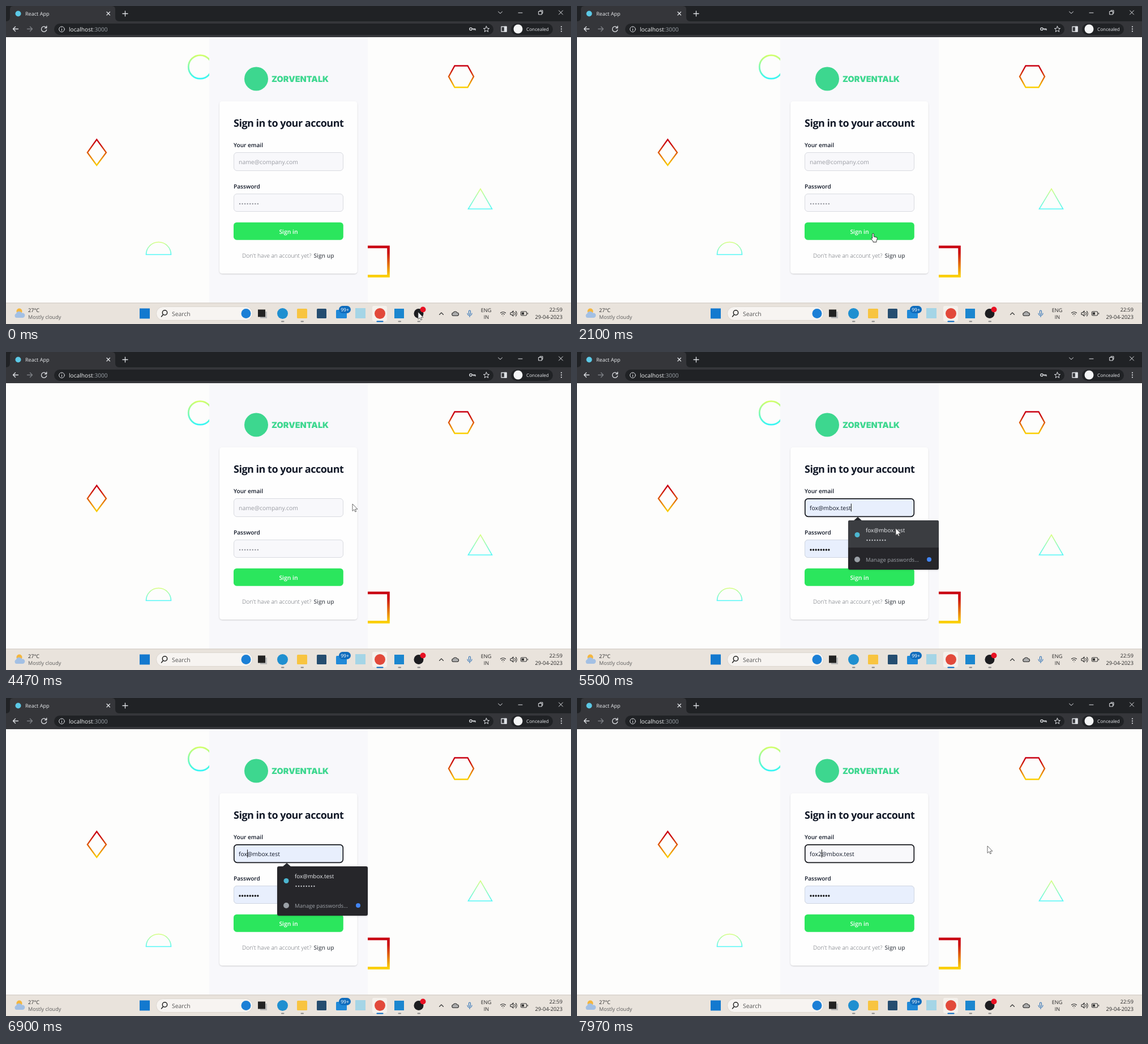
Write an HTML page that moves like this. It is 998x561 px and loops after 8000 ms.

```html
<!DOCTYPE html>
<html lang="en">
<head>
<meta charset="utf-8">
<title>Sign in</title>
<style>
html, body { margin: 0; width: 100%; height: 100%; overflow: hidden; background: #fdfdfc; }
svg { display: block; width: 100%; height: 100%; }
text { font-family: "Open Sans", "Noto Sans", sans-serif; font-size: 10.4px; fill: #111827; text-rendering: geometricPrecision; }
.small { font-size: 9.1px; fill: #262626; }
.label { font-size: 10.1px; font-weight: 600; }
.mid { text-anchor: middle; }
.end { text-anchor: end; }
.line { fill: none; stroke-linecap: round; stroke-linejoin: round; }
.chrome { stroke: #dfe1e5; stroke-width: 1.3; }
.tray { stroke: #303030; stroke-width: 1.1; }
.dots { stroke-dasharray: 0 4.55; }
.warm { stroke: url(#warm); fill: none; }
.cool { stroke: url(#cool); fill: none; }
.cue { opacity: 0; }
#bar { transform-box: fill-box; transform-origin: left; }
</style>
</head>
<body>
<svg viewBox="0 0 998 561" preserveAspectRatio="none">
  <defs>
    <linearGradient id="warm" x2="0" y2="1"><stop stop-color="#c90012"/><stop offset=".2" stop-color="#cc1010"/><stop offset="1" stop-color="#fbd000"/></linearGradient>
    <linearGradient id="cool" x2="0" y2="1"><stop stop-color="#d2ff6a"/><stop offset="1" stop-color="#35f6f6"/></linearGradient>
    <filter id="soft" x="-10%" y="-20%" width="120%" height="150%"><feDropShadow dx="0" dy="1" stdDeviation="1.2" flood-opacity=".18"/></filter>
    <filter id="lift" x="-10%" y="-20%" width="120%" height="160%"><feDropShadow dx="0" dy="1" stdDeviation="4" flood-opacity=".16"/></filter>
  </defs>

  <!-- page -->
  <rect width="998" height="561" fill="#fdfdfc"/>
  <circle class="cool" cx="343" cy="107.5" r="20.7" stroke-width="2.8"/>
  <path class="warm" stroke-width="2.4" d="M782 124.5 792.5 105.500H815.500L826 124.500 815.500 143.500H792.500Z"/>
  <path class="warm" stroke-width="2.3" d="M160.200 235.500 177 258.500 160.200 281 143.800 258.500Z"/>
  <path class="cool" stroke-width="1.6" opacity=".85" d="M838 322.500 858.500 358H816.500Z"/>
  <path class="cool" stroke-width="1.6" opacity=".85" d="M247.500 438.500A22 22 0 0 1 291.500 438.500Z"/>
  <rect class="warm" x="622" y="425" width="53.500" height="51.500" stroke-width="4.600"/>
  <rect x="359" y="55" width="280" height="469" fill="#f8f8fb"/>

  <circle cx="442" cy="128.500" r="21" fill="#3dd78f"/>
  <text x="469" y="133.500" style="font:900 14.500px Inter,sans-serif;fill:#3dd78f">ZORVENTALK</text>

  <rect x="377" y="168" width="243.500" height="304" rx="5" fill="#fefefe" filter="url(#soft)"/>
  <text x="402" y="213" style="font-size:18px;font-weight:700;letter-spacing:-.5px">Sign in to your account</text>
  <text class="label" x="402" y="248.500">Your email</text>
  <text class="label" x="402" y="321.500">Password</text>
  <g stroke="#d9dbe1" fill="#f8f8fb">
    <rect x="402.500" y="258.500" width="193" height="32" rx="5.500"/>
    <rect x="402.500" y="331.500" width="193" height="31" rx="5.500"/>
  </g>
  <g id="placeholder" class="cue">
    <text x="411" y="279" style="fill:#9a9ca3">name@company.com</text>
    <path class="line dots" stroke="#96989f" stroke-width="2.500" d="M413 349H446"/>
  </g>
  <rect id="mailTint" class="cue" x="402.500" y="258.500" width="193" height="32" rx="5.500" fill="#e8effd"/>
  <g id="secret" class="cue">
    <rect x="402.500" y="331.500" width="193" height="31" rx="5.500" fill="#e8effd" stroke="#d0d6e2"/>
    <path class="line dots" stroke="#111" stroke-width="3.400" d="M413 349H446"/>
  </g>
  <rect id="focus" class="cue" x="402.800" y="258.800" width="192.500" height="31.500" rx="5.500" fill="none" stroke="#16181d" stroke-width="1.700"/>
  <text id="mail" class="cue" x="411" y="279">fox@mbox.test</text>
  <text id="mailEdited" class="cue" x="411" y="279">fox2@mbox.test</text>
  <g id="caret"><rect id="blink" class="cue" x="411" y="267.500" width="1" height="14" fill="#111"/></g>

  <rect id="ring" class="cue" x="399.500" y="379.500" width="198.500" height="36" rx="8" fill="#9dbdf0"/>
  <rect x="402" y="381.700" width="193.800" height="31" rx="5.500" fill="#2be65d"/>
  <text class="mid" x="499" y="402" style="font-weight:600;fill:#fff">Sign in</text>
  <text x="417" y="444" style="font-size:10.2px;font-weight:300;fill:#62666d">Don't have an account yet?</text>
  <text x="543.500" y="444" style="font-size:10.2px;font-weight:600;fill:#555960">Sign up</text>

  <!-- saved password list -->
  <g id="list" class="cue">
    <path d="M488 298 496 291 504 298Z" fill="#25272b"/>
    <rect x="479" y="297" width="160" height="87" rx="3" fill="#25272b" filter="url(#soft)"/>
    <path id="hover" class="cue" d="M479 345V300Q479 297 482 297H636Q639 297 639 300V345Z" fill="#3b3d41"/>
    <circle cx="495" cy="322.500" r="4.500" fill="#4cb6d0"/>
    <text x="510" y="318" style="font-size:9.900px;fill:#eceef1">fox@mbox.test</text>
    <path class="line dots" stroke="#c3c5c9" stroke-width="2.400" d="M512.500 332H545"/>
    <circle cx="495" cy="366" r="5" fill="#9aa0a6"/>
    <text x="510" y="370" style="font-size:9.600px;fill:#9da1a7">Manage passwords...</text>
    <circle cx="622" cy="366" r="4" fill="#4285f4"/>
  </g>

  <!-- toast -->
  <g id="toast" class="cue">
    <rect x="738.500" y="71" width="244.500" height="50" rx="2" fill="#fff" filter="url(#lift)"/>
    <path class="line" d="M758 90 764.500 102H751.500Z" stroke="#e9c515" stroke-width="2.500" style="fill:#e9c515"/>
    <path class="line" d="M758 93V97.500M758 100.500V100.600" stroke="#fff" stroke-width="1.700"/>
    <text class="mid" x="867" y="100.500" style="font:12.600px 'Liberation Sans',Arial,sans-serif;fill:#757575">Please fill all feilds !</text>
    <path class="line" d="M967 81 973 87M973 81 967 87" stroke="#777" stroke-width="1.500"/>
    <rect id="bar" x="738.500" y="118" width="244.500" height="3" fill="#e6c41c"/>
  </g>

  <!-- browser frame -->
  <rect width="998" height="27" fill="#202225"/>
  <path d="M0 27Q7 27 7 20V6Q7 0 13 0H187Q193 0 193 6V20Q193 27 200 27H998V55H0Z" fill="#35363a"/>
  <rect x="85" y="31" width="776" height="20" rx="10" fill="#202225"/>
  <rect x="892" y="31" width="74" height="20" rx="10" fill="#202225"/>
  <circle cx="21.500" cy="13.500" r="5" fill="#5cc9e6"/>
  <text class="small" x="34" y="17" style="fill:#e8eaed">React App</text>
  <text x="111" y="44.700" style="font-size:10.200px;fill:#f1f3f4">localhost<tspan fill="#9aa0a6">:3000</tspan></text>
  <circle cx="904.500" cy="40.500" r="8" fill="#f4f5f6"/>
  <text class="small" x="919" y="44" style="font-size:8.200px;fill:#e8eaed">Concealed</text>
  <g class="line chrome">
    <path d="M178 10.500 183.500 16M183.500 10.500 178 16M206 13.500H215M210.500 9V18"/>
    <path d="M21.500 40.500H12.500M16.500 36.500 12.500 40.500 16.500 44.500"/>
    <path d="M37.500 40.500H46.500M42.500 36.500 46.500 40.500 42.500 44.500" stroke="#7c7f84"/>
    <path d="M71 38A4.700 4.700 0 1 0 71.700 42M71.800 35.500V38.800H68.500"/>
    <path d="M98.500 40.500V43.500M98.500 38V38.100" stroke-width="1"/><circle cx="98.500" cy="41" r="4.800" stroke-width="1"/>
    <circle cx="821" cy="40.500" r="2.200"/><path d="M823.500 40.500H829V42.500M826.500 40.500V42"/>
    <path d="M848.500 35.500 850 39.300 853.500 39.600 850.800 42 851.700 45.500 848.500 43.500 845.300 45.500 846.200 42 843.500 39.600 847 39.300Z" stroke-width="1"/>
    <path d="M875 36.500H884V45H875Z"/><path d="M880.500 36.500H884V45H880.500Z" fill="#dfe1e5"/>
    <path d="M981 36.500V36.600M981 40.500V40.600M981 44.500V44.600" stroke-width="2.200"/>
    <path d="M869.500 10 873 13.200 876.500 10M905 12H912M941 9.500H946.500V15H941ZM943 9.500V7.800H948V13H946.500M976.500 8 983.500 15M983.500 8 976.500 15" stroke-width="1"/>
  </g>

  <!-- taskbar -->
  <rect y="523.500" width="998" height="37.500" fill="#e9e3dc"/>
  <path d="M0 524H998" stroke="#cfcac4"/>
  <circle cx="23.500" cy="538.500" r="5" fill="#f4b63d"/>
  <path d="M18 550A4 4 0 0 1 18 542.500 5.500 5.500 0 0 1 28 541.500 4.300 4.300 0 0 1 30 550Z" fill="#a3c0e4"/>
  <text class="small" x="39" y="539.500">27°C</text>
  <text class="small" x="39" y="552" style="fill:#5b5b5b">Mostly cloudy</text>
  <rect x="236" y="533.500" width="18" height="18" fill="#1379cf"/>
  <rect x="265.500" y="530.500" width="170" height="24" rx="12" fill="#f7f4f1" stroke="#ddd7d0"/>
  <g class="line" stroke="#222" stroke-width="1.500"><circle cx="280.500" cy="541" r="4.200"/><path d="M277.500 544.500 274.500 548"/></g>
  <text x="293" y="546.500" style="fill:#555">Search</text>
  <circle cx="424" cy="542.500" r="8.500" fill="#1b7fd6"/>
  <rect x="449" y="539" width="12" height="12" fill="#bcbcbc"/><rect x="445" y="535.500" width="13" height="13" fill="#222"/>
  <circle cx="488.500" cy="542.500" r="9.500" fill="#1f8fd0"/>
  <rect x="514" y="534" width="18" height="17" rx="1.500" fill="#f8c440"/>
  <rect x="549" y="534" width="17" height="17" rx="1.500" fill="#254d70"/>
  <rect x="583" y="536" width="19" height="15" rx="1.500" fill="#2089d8"/>
  <rect x="588" y="529" width="21" height="13" rx="6.500" fill="#0f6cbd"/>
  <text class="mid" x="598.500" y="538.800" style="font-size:8.600px;fill:#fff">99+</text>
  <rect x="617" y="533" width="18" height="18" fill="#a5d5e6"/>
  <rect x="647" y="529" width="26" height="27" rx="3" fill="#f5f1ec"/>
  <circle cx="660.500" cy="542.500" r="9.500" fill="#e2493a"/>
  <rect x="686" y="534" width="17" height="17" fill="#1b86cf"/>
  <circle cx="729" cy="542.500" r="8.500" fill="#1d1d20"/><circle cx="736.500" cy="535.500" r="5" fill="#e81123"/>
  <path class="line" stroke="#888" stroke-width="2" d="M487 556.500H490.500M521.500 556.500H525M693.500 556.500H697M727.500 556.500H731"/>
  <path class="line" stroke="#0067c0" stroke-width="2.200" d="M655.500 556.500H665.500"/>
  <g class="line tray">
    <path d="M765.500 544.500 769 541 772.500 544.500"/>
    <path d="M790 546.500A2.800 2.800 0 0 1 790 541 4 4 0 0 1 797 541 2.800 2.800 0 0 1 797.500 546.500Z" fill="#aaa"/>
    <path d="M817.500 538.500A1.500 1.500 0 0 1 820.500 538.500V542.500A1.500 1.500 0 0 1 817.500 542.500ZM815 542A4 4 0 0 0 823 542M819 546V548.500" stroke="#3275b8"/>
    <path d="M873.500 541.500A6.500 6.500 0 0 1 882.500 541.500M875.500 544A3.600 3.600 0 0 1 880.500 544M878 546.500V546.600"/>
    <path d="M891 541H893L896 538V547L893 544.500H891ZM898.500 540.500A3 3 0 0 1 898.500 545M900.500 538.500A6 6 0 0 1 900.500 547"/>
    <rect x="909.500" y="539" width="10" height="7" rx="1.500"/><path d="M921.500 541.500V543.500"/><path d="M911.500 541H914.500V544H911.500Z" fill="#303030"/>
  </g>
  <text class="small mid" x="848" y="540.300">ENG</text>
  <text class="small mid" x="848.500" y="552">IN</text>
  <text class="small end" x="983" y="539">22:59</text>
  <text class="small end" x="983" y="551.500" style="font-size:9.300px">29-04-2023</text>

  <!-- pointer -->
  <g id="pointer">
    <path id="arrow" class="cue" d="M0 0V12.500L2.900 9.900 4.800 14 6.700 13.200 4.900 9.200H8.900Z" fill="#fff" stroke="#444" stroke-width=".8"/>
    <path id="hand" class="cue" d="M-1.300 1Q0-.8 1.300 1V6L6 7Q7.500 7.500 7.300 9.500L6 13.500V15.500H0V14L-3.500 9.500Q-3.600 7.500-1.300 9Z" fill="#fff" stroke="#222" stroke-width=".9"/>
    <path id="beam" class="cue line" d="M-2-6H2M0-6V6M-2 6H2" stroke="#222" stroke-width=".9"/>
  </g>
</svg>
<script>
const LOOP = 8000;
const $ = id => document.getElementById(id);
const at = (x, y = 0) => ({ transform: `translate(${x}px, ${y}px)` });

function play(id, steps, easing = 'linear') {
  const last = steps[steps.length - 1];
  const all = last[0] < LOOP ? [...steps, [LOOP, last[1]]] : steps;
  $(id).animate(all.map(([t, style, ease]) => ({ offset: t / LOOP, easing: ease || easing, ...style })),
    { duration: LOOP, iterations: Infinity });
}

// Visible only inside the given [from, to] spans.
function show(id, ...spans) {
  const steps = spans[0][0] > 0 ? [[0, { opacity: 0 }]] : [];
  for (const [from, to] of spans) {
    steps.push([from, { opacity: 1 }]);
    if (to < LOOP) steps.push([to, { opacity: 0 }]);
  }
  play(id, steps, 'step-end');
}

const CLICK = 2230, CLOSE = 3550, FOCUS = 4800, FILL = 5200, PICK = 5700, REOPEN = 6300, EDIT = 7300;

show('ring', [CLICK, CLOSE]);
show('placeholder', [0, FILL]);
show('focus', [FOCUS, LOOP]);
show('mailTint', [FILL, EDIT]);
show('secret', [FILL, LOOP]);
show('mail', [FILL, EDIT]);
show('mailEdited', [EDIT, LOOP]);
show('list', [FOCUS + 50, PICK], [REOPEN + 50, EDIT]);
show('hover', [FILL - 50, PICK]);
show('blink', [FOCUS, FOCUS + 300], [FILL, PICK], [REOPEN, 6500], [6780, 7040], [EDIT, 7600], [7860, LOOP]);

const width = (id, count) => $(id).getSubStringLength(0, count);
play('caret', [
  [0, at(0)], [FILL, at(width('mail', 13))],
  [REOPEN, at(width('mail', 3))], [EDIT, at(width('mailEdited', 4))]
], 'step-end');

const bounce = 'cubic-bezier(.215,.61,.355,1)';
const slide = (x, opacity) => ({ ...at(x), opacity });
play('toast', [
  [0, slide(1900, 0)], [CLICK, slide(1900, 0), bounce],
  [CLICK + 420, slide(-16, 1), bounce], [CLICK + 525, slide(6, 1), bounce],
  [CLICK + 630, slide(-3, 1), bounce], [CLICK + 700, slide(0, 1)],
  [CLOSE, slide(0, 1), 'ease'], [CLOSE + 140, slide(-13, 1), 'ease'],
  [CLOSE + 700, slide(1300, 0)]
]);
const left = t => ({ transform: `scaleX(${1 - (t - CLICK) / 5000})` });
play('bar', [[0, left(CLICK)], [CLICK, left(CLICK)], [CLOSE + 700, left(CLOSE + 700)]]);

play('pointer', [
  [0, at(728, 540)], [200, at(728, 540)], [900, at(523, 401)], [2480, at(523, 401)],
  [3130, at(843, 170)], [3400, at(969, 84)], [3600, at(969, 84)], [4470, at(612, 268)],
  [FOCUS, at(560, 276)], [4900, at(560, 276)], [5250, at(563, 311)], [PICK, at(563, 311)],
  [6200, at(426, 275)], [7450, at(426, 275)], [7950, at(725, 261)]
], 'ease-in-out');
show('arrow', [0, 820], [2560, 4580], [5060, 6060], [7620, LOOP]);
show('hand', [820, 2560]);
show('beam', [4580, 5060], [6060, 6800]);
</script>
</body>
</html>
```
